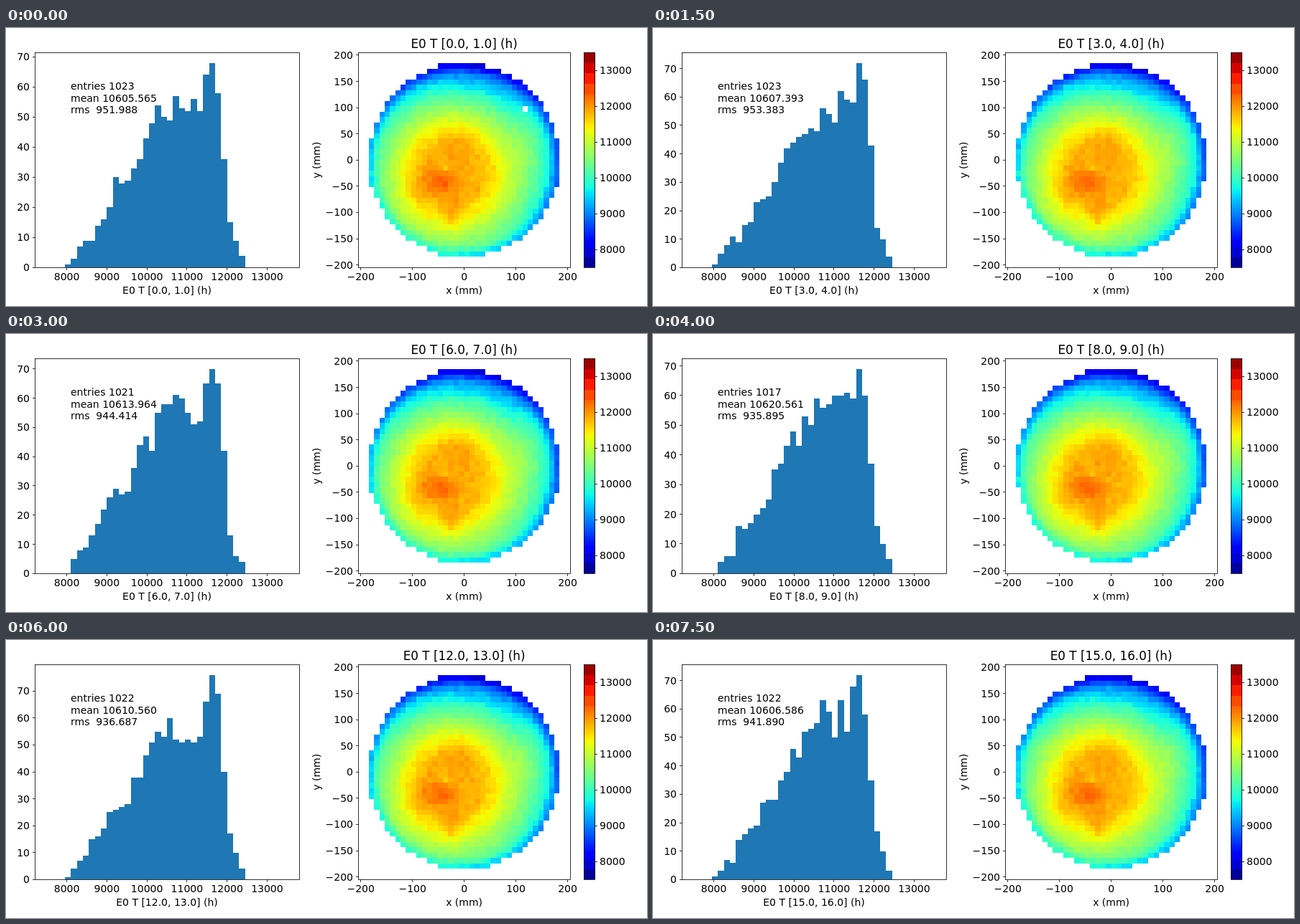
An HTML page with a canvas for the animation above (8000 ms loop, 892 px wide and 388 px high).

```html
<!DOCTYPE html>
<html lang="en">
<head>
<meta charset="utf-8">
<title>E0 map over time</title>
<style>
html, body { margin: 0; width: 100%; height: 100%; overflow: hidden; background: #fff; }
canvas { display: block; }
</style>
</head>
<body>
<canvas id="stage" width="892" height="388"></canvas>
<script>
const ctx = document.getElementById('stage').getContext('2d');
const STEP = 500, HOURS = 16, FONT = '"DejaVu Sans", sans-serif';
const MAP = { x: 637.6, y: 184.3, cellW: 7.375, cellH: 7.5, pitch: 10.25 };

// Key readings: hour, entries, mean, rms, tallest bin. Hours between are blended.
const READINGS = [
  [0, 1023, 10605.565, 951.988, 68],
  [2, 1023, 10605.757, 955.738, 72],
  [5, 1023, 10610.665, 948.674, 71],
  [8, 1017, 10620.561, 935.895, 69],
  [10, 1023, 10612.164, 942.161, 73],
  [12, 1022, 10610.560, 936.687, 76],
  [15, 1022, 10606.586, 941.890, 72]];

// Mean bin counts, as [bin, count]; bin 0 starts at 7950, bins are 150 wide.
const PROFILE = [[0, .6], [2, 7], [3, 8], [5, 17], [10, 32], [15, 50], [18, 57], [22, 57],
  [24, 70], [25, 63], [26, 38], [27, 15], [28, 8], [30, 0]];
const PEAK_BIN = 24;

// Energy against distance (mm) from the bright centre, and local bumps on top.
const FALLOFF = [[0, 11900], [58, 11800], [90, 11330], [145, 10150], [175, 9350], [220, 8050]];
const BUMPS = [ // x, y, height, width, length
  [-38, -43, 450, 16, 12],
  [-68, -38, 180, 18, 18],
  [-12, 25, 110, 16, 25],
  [-24, -106, 330, 12, 22],
  [-34, -14, -260, 7, 6],
  [-95, -70, 170, 24, 30],
  [140, 50, 550, 32, 60]];

const RED = [[.35, 0], [.66, 1], [.89, 1], [1, .5]];
const GREEN = [[.125, 0], [.375, 1], [.64, 1], [.91, 0]];
const BLUE = [[0, .5], [.11, 1], [.34, 1], [.65, 0]];

const lerp = (a, b, t) => a + (b - a) * t;
const clamp = v => Math.min(1, Math.max(0, v));
function curve(points, x) {
  const n = points.findIndex(p => p[0] >= x);
  if (n < 0) return points[points.length - 1][1];
  if (n === 0) return points[0][1];
  const [x0, y0] = points[n - 1], [x1, y1] = points[n];
  return lerp(y0, y1, (x - x0) / (x1 - x0));
}
// Repeatable noise in -1..1
const noise = (i, j, k) => {
  const s = Math.sin(i * 127.1 + j * 311.7 + k * 74.7) * 43758.5453;
  return (s - Math.floor(s)) * 2 - 1;
};
const jet = v => `rgb(${[RED, GREEN, BLUE].map(c => Math.round(255 * curve(c, clamp(v))))})`;

function dataAt(h) {
  const [entries, mean, rms, top] = [1, 2, 3, 4].map(col => curve(READINGS.map(r => [r[0], r[col]]), h));
  const peak = Math.round(top), bins = [];
  for (let i = 0; i < 31; i++) {
    const n = curve(PROFILE, i);
    bins.push(i === PEAK_BIN ? peak
      : Math.min(peak - 3, Math.round(n + .9 * Math.sqrt(n) * noise(i, 5, h))));
  }
  return { bins, peak, entries: Math.round(entries), mean, rms };
}

function energy(x, y) {
  const r = Math.hypot(x, y);
  let v = curve(FALLOFF, Math.hypot(x + 22, y + 22)) - 450 * clamp((r - 165) / 15);
  v += (r / 180) ** 2 * ((x > 0 ? 500 : -200) * x + (y < 0 ? -350 * y : 0)) / 180;
  for (const [bx, by, height, w, l] of BUMPS)
    v += height * Math.exp(-(((x - bx) / w) ** 2 + ((y - by) / l) ** 2) / 2);
  return v;
}

// A disc with a ragged rim; one empty cell wanders down early on.
function filled(i, j, h) {
  const r2 = i * i + j * j;
  const hole = h < 3 && Math.hypot(i - 11.5 + h, j - 9.5 + 9.5 * h) < .5;
  return !hole && (r2 <= 324 || r2 < 327 && noise(i, j, h) > .2);
}

function box(x0, y0, x1, y1, fill) {
  x0 = Math.round(x0); y0 = Math.round(y0);
  ctx.fillStyle = fill;
  ctx.fillRect(x0, y0, Math.round(x1) - x0, Math.round(y1) - y0);
}
function text(s, x, y, align = 'center', size = 14) {
  ctx.font = `${size}px ${FONT}`;
  ctx.textAlign = align;
  ctx.fillStyle = '#000';
  ctx.fillText(s, x, y);
}
function line(x0, y0, x1, y1) {
  ctx.beginPath();
  ctx.moveTo(x0, y0);
  ctx.lineTo(x1, y1);
  ctx.stroke();
}
const snap = v => Math.floor(v) + .5;
const label = v => String(v).replace('-', '\u2212');
function tickX(v, x) {
  line(snap(x), 334.5, snap(x), 338);
  text(label(v), x, 352);
}
function tickY(v, y, left) {
  line(left - 3.5, snap(y), left, snap(y));
  text(label(v), left - 7.5, Math.round(y + 5), 'right');
}

function drawHistogram(d, name) {
  const scale = 300 / (d.peak * 1.05), binX = i => 56.73 + (i + 3) * 8.3636;
  d.bins.forEach((n, i) => box(binX(i), 334.4 - n * scale, binX(i + 1), 334.4, '#1f77b4'));
  ctx.strokeRect(40.5, 34.5, 368, 300);
  for (let v = 8000; v <= 13000; v += 1000) tickX(v, 56.73 + (v - 7500) * .055757);
  for (let v = 0; v <= d.peak * 1.05; v += 10) tickY(v, 334.4 - v * scale, 40.5);
  text(name, 224, 371);
  [`entries ${d.entries}`, `mean ${d.mean.toFixed(3)}`, `rms  ${d.rms.toFixed(3)}`]
    .forEach((s, i) => text(s, 90, Math.round(86 + i * 16.6), 'left'));
}

function drawMap(h, name) {
  const { x: cx, y: cy, cellW, cellH, pitch } = MAP;
  for (let i = -17.5; i < 18; i++) for (let j = -17.5; j < 18; j++) {
    if (!filled(i, j, h)) continue;
    const v = energy(i * pitch, j * pitch) + 85 * noise(i, j, 99) + 55 * noise(i, j, h);
    box(cx + (i - .5) * cellW, cy - (j + .5) * cellH,
      cx + (i + .5) * cellW, cy - (j - .5) * cellH, jet((v - 7500) / 6000));
  }
  ctx.strokeRect(490.5, 34.5, 295, 300);
  for (let v = -200; v <= 200; v += 100) tickX(v, cx + v * .7195);
  for (let v = -200; v <= 200; v += 50) tickY(v, cy - v * .7317, 490.5);
  text('x (mm)', cx, 371);
  text(name, cx, 28, 'center', 16.8);
  ctx.save();
  ctx.translate(437, cy);
  ctx.rotate(-Math.PI / 2);
  text('y (mm)', 0, 0);
  ctx.restore();
}

function drawColorbar() {
  // Both ends show coarse bands, the middle is smooth.
  for (let y = 34; y < 334; y++) {
    const band = y < 92 || y > 304 ? 14.5 : 2;
    const mid = y < 92 ? 34 + (Math.floor((y - 34) / band) + .5) * band
      : 334 - (Math.floor((334 - y) / band) + .5) * band;
    box(804, y, 820, y + 1, jet((334 - mid) / 300));
  }
  ctx.strokeRect(804.5, 34.5, 15, 300);
  for (let v = 8000; v <= 13000; v += 1000) {
    const y = 334.4 - (v - 7500) / 20;
    line(819.5, snap(y), 823, snap(y));
    text(v, 826, Math.round(y + 5), 'left');
  }
}

function draw(h) {
  const d = dataAt(h), name = `E0 T [${h}.0, ${h + 1}.0] (h)`;
  box(0, 0, 892, 388, '#fff');
  ctx.strokeStyle = '#000';
  ctx.lineWidth = .8;
  drawHistogram(d, name);
  drawMap(h, name);
  drawColorbar();
}

let shown = -1;
const start = performance.now();
function tick() {
  const h = Math.floor((performance.now() - start) / STEP) % HOURS;
  if (h !== shown) draw(shown = h);
  requestAnimationFrame(tick);
}
tick();
</script>
</body>
</html>
```
